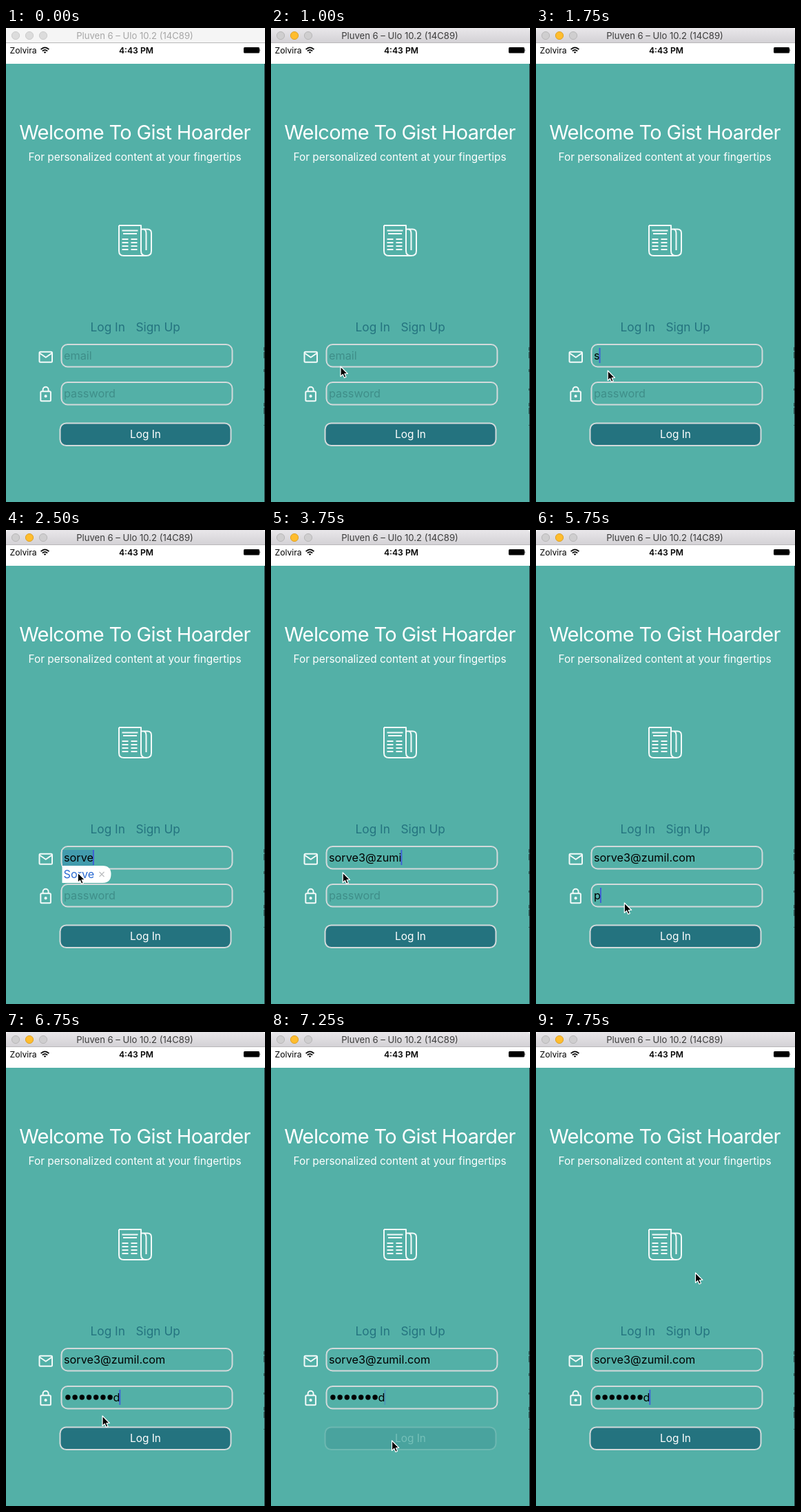
Recreate the animation shown at these times as an HTML page. Size 376 by 689 pixels, loop 8 s.

```html
<!DOCTYPE html>
<html lang="en">
<head>
<meta charset="utf-8">
<title>Login screen</title>
<style>
  html, body { margin: 0; width: 100%; height: 100%; overflow: hidden; background: #53b0a7; }
  svg { display: block; width: 100%; height: 100%; }
  text { font-family: Inter, Roboto, "Liberation Sans", sans-serif; white-space: pre; }
  .mid { text-anchor: middle; }
  .input { font-size: 16.25px; }
  .hint { fill: #3f8e89; }
  .tab { font-size: 17.3px; fill: #24737f; }
  .line { fill: none; stroke: #f3faf9; stroke-width: 2; stroke-linejoin: round; }
  .box { fill: none; stroke: #d3dadb; stroke-width: 2; }
</style>
</head>
<body>
<svg viewBox="0 0 376 689" preserveAspectRatio="none">
  <defs>
    <linearGradient id="chrome" x2="0" y2="1">
      <stop offset="0" stop-color="#e9e7ea"/>
      <stop offset="1" stop-color="#d3d1d5"/>
    </linearGradient>
  </defs>
  <rect width="376" height="689" fill="#53b0a7"/>
  <rect width="376" height="52" fill="#fff"/>

  <!-- window title bar -->
  <path id="bar" d="M0 21.5V5Q0 0 5 0H371Q376 0 376 5V21.5Z"/>
  <path d="M0 21.5H376" stroke="#b9b8b9"/>
  <g id="lights">
    <circle cx="14" cy="11" r="5.6"/>
    <circle cx="34" cy="11" r="5.6"/>
    <circle cx="54" cy="11" r="5.6"/>
  </g>
  <text id="title" class="mid" x="187" y="16" font-size="13.1">Pluven 6 – Ulo 10.2 (14C89)</text>

  <!-- status bar -->
  <text x="5.5" y="37" font-size="12.2">Zolvira</text>
  <g fill="none" stroke="#000" stroke-width="1.8">
    <path d="M50.6 31.2Q56.5 25.6 62.4 31.2M52.9 33.5Q56.5 30.2 60.1 33.5"/>
    <path d="M56.5 37L54.7 35.1Q56.5 33.6 58.3 35.1Z" fill="#000" stroke="none"/>
  </g>
  <text class="mid" x="189" y="37" font-size="12.2" font-weight="600">4:43 PM</text>
  <rect x="345" y="28" width="23" height="8.5" rx="1.5"/>
  <path d="M368.6 30.6Q370.2 32.2 368.6 33.9Z"/>

  <!-- heading -->
  <g class="mid" fill="#fff">
    <text x="187" y="161.5" font-size="29" letter-spacing="-.65">Welcome To Gist Hoarder</text>
    <text x="187" y="193" font-size="15.4">For personalized content at your fingertips</text>
  </g>

  <!-- newspaper -->
  <g class="line">
    <path d="M164 287H196V324Q196 331 203.5 331Q211 331 211 324V298Q211 292.5 205.5 292.5H196M164 287V324Q164 331 171 331H204"/>
    <path d="M203.5 323V299Q203.5 293 200 292.5"/>
    <path d="M168.5 294.5H191.5M170 299H190"/>
    <path id="columns"/>
  </g>

  <text class="tab" x="122.5" y="440.5">Log In</text>
  <text class="tab" x="188.5" y="440.5">Sign Up</text>

  <!-- field icons -->
  <g class="line" transform="translate(0 -.8)">
    <rect x="48.5" y="471.5" width="18.5" height="15" rx="1.5"/>
    <path d="M49 473.5L57.75 479.5L66.5 473.5"/>
    <rect x="50.3" y="529" width="14.6" height="14" rx="1.5"/>
    <path d="M53.6 529V526.5A4 4 0 0 1 61.6 526.5V529"/>
    <circle cx="57.6" cy="536" r="1.1"/>
  </g>

  <rect class="box" x="80.5" y="460" width="248" height="32.5" rx="9"/>
  <rect class="box" x="80.5" y="515" width="248" height="32.5" rx="9"/>

  <rect id="mark" x="82" y="465" width="45" height="23" fill="#429bad"/>
  <text id="mailHint" class="input hint" x="84" y="481.5">email</text>
  <text id="mail" class="input" x="84" y="482"></text>
  <text id="passHint" class="input hint" x="84" y="536.5">password</text>
  <g id="dots"></g>
  <text id="pass" class="input" y="537"></text>
  <rect id="caret" width="1.9" height="22" fill="#3f5fd6"/>

  <g id="button">
    <rect class="box" x="78.5" y="574.4" width="248" height="32.7" rx="9" style="fill:#24737f"/>
    <text class="mid" x="202.5" y="596" font-size="15.4" fill="#fff">Log In</text>
  </g>

  <!-- correction bubble -->
  <g id="bubble">
    <path d="M81.5 488H140Q152.5 488 152.5 500.5T140 513H81.5Z" fill="#fff"/>
    <text class="input" x="83.5" y="506" fill="#2a6ad2">Sorve</text>
    <path d="M135.5 497L142.5 504M142.5 497L135.5 504" stroke="#b9bcbe" stroke-width="1.2"/>
  </g>

  <!-- dark slivers at the window's right edge -->
  <path d="M375.5 52V689" stroke="#26393b"/>
  <path d="M374.5 464V578" stroke="#2c5653" stroke-dasharray="5 2 9 16 4 24 3 18"/>

  <path id="cursor" d="M0 0V14.5L3.3 11.4L5.5 16.4L8 15.3L5.9 10.5H10.3Z" stroke="#fff" stroke-width="1.2" stroke-linejoin="round"/>
</svg>
<script>
const LOOP = 8000, STEP = 250;
const MAIL = "sorve3@zumil.com", PASS = "password";
const LEFT = 84, DOT = 10.2;
const $ = id => document.getElementById(id);
const show = (id, on) => $(id).setAttribute("visibility", on ? "visible" : "hidden");
const set = (el, attrs) => { for (const k in attrs) el.setAttribute(k, attrs[k]); };

// [time, value] keys; a value holds until the next key
const pointer = [[0, null], [750, [101, 491]], [1000, [101, 492]], [1250, [103, 496]],
  [1500, [104.2, 498]], [4500, [110, 515]], [4750, [124, 538]], [5000, [128.3, 542]],
  [6750, [140, 558]], [7000, [174, 591]], [7250, [175.5, 594]], [7500, [198, 490]], [7750, [231.5, 350]]];
const mailTyped = [[0, 0], [1750, 1], [2000, 2], [2250, 3], [2500, 5], [3000, 6],
  [3250, 7], [3500, 9], [3750, 11], [4000, 13], [4250, 16]];
const passTyped = [[0, 0], [5750, 1], [6000, 2], [6250, 4], [6500, 6], [6750, 8]];
const focus = [[0, ""], [1500, "mail"], [5500, "pass"]];

const at = (keys, t) => keys.reduce((v, k) => t >= k[0] ? k[1] : v, null);

let rows = "";
for (let y = 307; y < 325; y += 5) rows += `M168.5 ${y}H177.5M181.5 ${y}H190.5`;
$("columns").setAttribute("d", rows);

const dots = [];
for (let i = 0; i < PASS.length - 1; i++) {
  const dot = document.createElementNS("http://www.w3.org/2000/svg", "circle");
  set(dot, { cx: LEFT + 5.9 + DOT * i, cy: 531, r: 3.7 });
  $("dots").append(dot);
  dots.push(dot);
}

function drawWindow(active) {
  $("bar").setAttribute("fill", active ? "url(#chrome)" : "#f5f5f5");
  $("title").setAttribute("fill", active ? "#3c3c3c" : "#a6a6a6");
  [...$("lights").children].forEach((light, i) => {
    const lit = active && i === 1;
    set(light, { fill: lit ? "#ffbd2e" : active ? "#cfcecf" : "#dcdcdc",
                 stroke: lit ? "#dfa023" : active ? "#b8b7b8" : "#cbcbcb" });
  });
}

function draw(t) {
  drawWindow(t >= 750);

  const m = at(mailTyped, t), p = at(passTyped, t);
  $("mail").textContent = MAIL.slice(0, m);
  show("mailHint", !m);
  show("passHint", !p);

  const hidden = Math.max(0, p - 1), passX = LEFT + DOT * hidden;
  dots.forEach((dot, i) => dot.setAttribute("visibility", i < hidden ? "visible" : "hidden"));
  $("pass").textContent = p ? PASS[p - 1] : "";
  $("pass").setAttribute("x", passX);

  const pressed = t >= 7250 && t < 7500;
  $("button").setAttribute("opacity", pressed ? 0.2 : 1);

  const field = at(focus, t), inMail = field === "mail";
  show("caret", field);
  if (field) {
    const typed = inMail ? m : p;
    const end = (inMail ? LEFT : passX) + (typed ? $(field).getComputedTextLength() : 1);
    set($("caret"), { x: end - 1, y: inMail ? 465 : 520, opacity: pressed ? 0.3 : 1 });
  }

  const suggesting = t >= 2500 && t < 3000;
  show("mark", suggesting);
  show("bubble", suggesting);

  const tip = at(pointer, t);
  show("cursor", tip);
  if (tip) $("cursor").setAttribute("transform", `translate(${tip})`);
}

const start = performance.now();
function tick() {
  const t = (performance.now() - start) % LOOP;
  draw(Math.floor(t / STEP) * STEP);
  requestAnimationFrame(tick);
}
tick();
</script>
</body>
</html>
```
